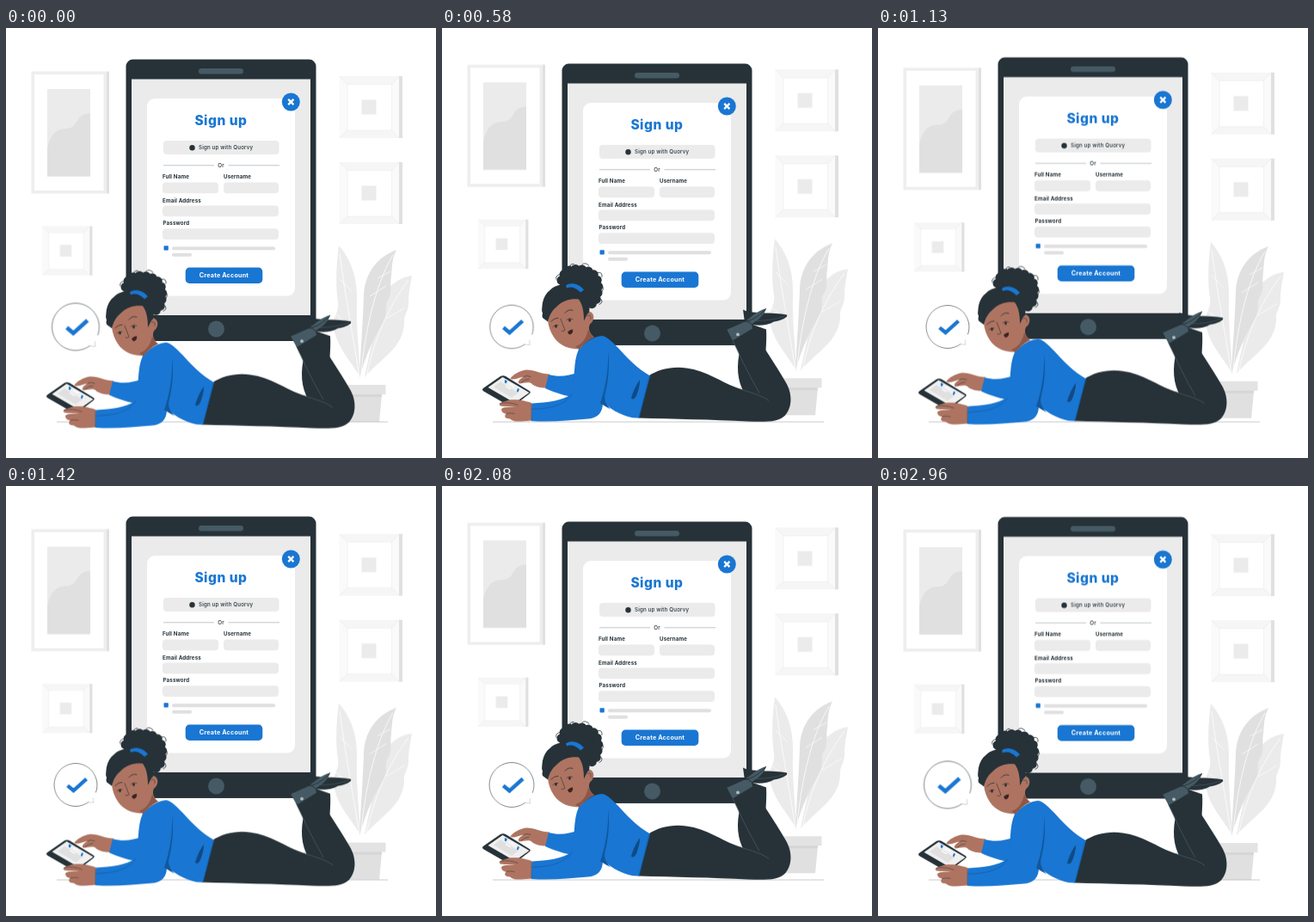
An HTML page for the animation above (3 s loop, 500x500 px).

```html
<!DOCTYPE html>
<html lang="en">
<head>
<meta charset="utf-8">
<title>Sign up</title>
<style>
  html, body { margin: 0; width: 100%; height: 100%; overflow: hidden; background: #fff; }
  svg { display: block; width: 100%; height: 100%; }
  text { font-family: Inter, "Open Sans", sans-serif; fill: #263238; }
  .label { font-size: 6.2px; font-weight: 700; letter-spacing: .14px; }
  .small { font-size: 6.2px; font-weight: 500; letter-spacing: .17px; }
  .mid { text-anchor: middle; }
  .blue { fill: #1976d2; }
  .dark { fill: #263238; }
  .slate { fill: #455a64; }
  .skin { fill: #ae7461; }
  .g2 { fill: #ebebeb; }
  .g3 { fill: #e0e0e0; }
  .line { fill: none; stroke: #263238; stroke-width: .8; stroke-linecap: round; stroke-linejoin: round; }
  .curls { fill: none; stroke: #263238; stroke-linecap: round; }
  .float { animation: float 1.5s linear -25ms infinite; }
  .late { animation-delay: -1025ms; }
  .pulse { animation: pulse 1s linear infinite; transform-origin: 81px 347.5px; }
  @keyframes float { 50% { transform: translateY(-10px); } }
  @keyframes pulse {
    0%, 74%, 100% { transform: scale(1.1); }
    13%, 56% { transform: scale(1); }
  }
</style>
</head>
<body>
<svg viewBox="0 0 500 500">
  <defs>
    <g id="frame">
      <path class="g3" d="M69 0h4.500v72h-4.500z"/>
      <path d="M0 0h69.500v72H0z" fill="#fafafa"/>
      <path d="M0 0h69.500L61 9.500H9.500zM0 72h69.500L61 63H9.500z" fill="#f6f6f6"/>
      <path d="M9.500 9.500H61V63H9.500z" fill="#fff" stroke="#ebebeb" stroke-width=".6"/>
      <path d="M0 0l9.500 9.500M69.500 0L61 9.500M0 72l9.500-9M69.500 72L61 63" stroke="#e6e6e6" stroke-width=".5"/>
      <path class="g2" d="M26 27.500h17v17H26z"/>
    </g>
  </defs>

  <!-- wall and plant -->
  <g class="float"><g transform="translate(0 .3)">
    <path class="g3" d="M117 50.500h3v142h-3z"/>
    <path d="M29.500 50.500H117v142H29.500z" fill="#eee"/>
    <path d="M33 54h80.500v135H33z" fill="#fff"/>
    <path class="g2" d="M48 71h50v101.500H48z"/>
    <path class="g3" d="M48 140C51 124 59 117 69 117C82 117 82 106 88 102C92 99 95 100 98 99V172.500H48z"/>
    <use href="#frame" x="387.500" y="56"/>
    <use href="#frame" x="387.500" y="156"/>
    <use href="#frame" transform="translate(42 230.500) scale(.795)"/>

    <path class="g2" d="M387 253C400 268 409 288 408 318C407 350 411 380 412 406C401 387 383 370 381 346C380 335 388 330 386 318C383 300 384 275 387 253z"/>
    <path class="g2" d="M472 288C450 291 434 310 430 336C427 365 420 388 417 406C436 384 462 372 463 343C462 334 468 330 468 320C468 308 470 300 472 288z"/>
    <path class="g3" d="M454 258C432 266 417 285 416 311C415 345 412 380 411 408C418 380 429 357 439 342C444 334 440 325 443 318C450 309 446 300 448 288C449 276 449 268 454 258z"/>
    <path d="M388 262C394 310 404 360 412 412M450 264C428 300 416 360 412 412M468 293C444 325 426 365 418 412" fill="none" stroke="#fff" stroke-width=".8"/>
    <path d="M382 332l18 14M388 292l14 14M442 300l-19 12M447 283l-15 8M464 325l-22 13" stroke="#fff" stroke-width=".7"/>
    <path class="g3" d="M378 426H437L434 458H382z"/>
    <path d="M376 415h65.500v11H376z" fill="#e3e3e3"/>
    <path d="M378 426H437l-.4 3H378z" fill="#d6d6d6"/>
  </g></g>

  <path d="M59 458H444" stroke="#bdbdbd" stroke-width=".8"/>

  <!-- big device -->
  <g class="float late"><g transform="translate(0 5.900)">
    <rect class="dark" x="139.500" y="37" width="221" height="327.500" rx="8"/>
    <path class="g2" d="M146 60H354V334.500H146z"/>
    <rect class="slate" x="224" y="47.500" width="52" height="6.500" rx="3.250"/>
    <circle class="slate" cx="244.500" cy="350.500" r="9.500"/>
    <rect x="164" y="82.500" width="172" height="229.500" rx="9" fill="#fff"/>
    <circle class="blue" cx="331.300" cy="86.400" r="10.500"/>
    <path d="M328.200 83.300l6.200 6.200m0-6.200l-6.200 6.200" stroke="#fff" stroke-width="2.300"/>
    <text class="mid" x="249.900" y="113.300" font-size="15.500" font-weight="800" letter-spacing=".5" style="fill:#1976d2">Sign up</text>

    <rect class="g2" x="183" y="131.500" width="134.500" height="16" rx="4"/>
    <circle class="dark" cx="216.500" cy="139.700" r="3.200"/>
    <text class="small" x="224" y="141.800">Sign up with Quorvy</text>
    <path d="M183 160.200H242M258.500 160.200H318" stroke="#90a0a8" stroke-width=".6"/>
    <text class="small mid" x="250" y="162">Or</text>

    <text class="label" x="182" y="175.400">Full Name</text>
    <text class="label" x="253" y="175.400">Username</text>
    <text class="label" x="182" y="203.100">Email Address</text>
    <text class="label" x="182.500" y="229.900">Password</text>
    <g class="g2">
      <rect x="182" y="180" width="65" height="12.600" rx="4"/>
      <rect x="253" y="180" width="64" height="12.600" rx="4"/>
      <rect x="182" y="207" width="135" height="12.600" rx="4"/>
      <rect x="182" y="233.700" width="135" height="12.600" rx="4"/>
    </g>
    <rect class="blue" x="183.500" y="253.700" width="5.300" height="5.300" rx=".8"/>
    <rect class="g3" x="193" y="254.700" width="120" height="4" rx="2"/>
    <rect class="g3" x="193" y="262.200" width="23" height="4" rx="2"/>
    <rect class="blue" x="208.700" y="279" width="89.600" height="18.300" rx="4.500"/>
    <text class="mid" x="253.500" y="290.600" font-size="7.200" font-weight="700" letter-spacing=".18" style="fill:#fff">Create Account</text>
  </g></g>

  <!-- speech bubble -->
  <g class="pulse">
    <circle cx="81" cy="347.500" r="25" fill="#fff"/>
    <path d="M104.500 356A25 25 0 1 0 96 367.500" class="line" style="stroke-width:.55"/>
    <path d="M101.500 362.500Q101 366 102 368Q99 368.500 96 367.500" fill="#fff" stroke="#90989c" stroke-width=".4"/>
    <path d="M71.600 348.300L78.500 354.200L93.500 340.600" fill="none" stroke="#1976d2" stroke-width="4.300"/>
  </g>

  <!-- woman -->
  <g class="float"><g transform="translate(0 1.400)">
    <!-- far leg and shoe -->
    <path class="dark" d="M357 350L377 357C378 375 375 386 377 400L398 436L352 432C343 416 342 400 347 378L360 364z"/>
    <path class="dark" d="M350 334C356 339 386 337 401 340C403 343 394 347 386 348C376 354 362 353 352 349z"/>
    <path d="M362 347C376 347 388 346 399 341" fill="none" stroke="#455a64" stroke-width=".7"/>

    <!-- near leg -->
    <path class="dark" d="M239 412C252 403 268 400 284 402C308 405 325 419 346 426C354 429 362 430 368 430C357 410 347 388 337 368L361 355C372 376 387 396 400 419C407 431 408 447 399 457C391 465 376 465 355 464C315 462 268 461 228 460z"/>
    <path d="M338 370C347 390 358 412 369 431M346 426C358 431 369 432 380 440" fill="none" stroke="#52656e" stroke-width=".6"/>
    <path class="slate" d="M331 357L353 347C360 343 365 336 377 332.500C375 341 366 347 360 351L361 356L338 370z"/>
    <path d="M331 357L354 347L360 351M352 348C362 347 370 340 377 333" fill="none" stroke="#263238" stroke-width=".9"/>
    <circle cx="344" cy="363" r="1.900" fill="#b0bec5"/>

    <!-- far arm -->
    <path class="skin" d="M125 409C115 409 108 404 98 404C90 405 82 410 79.500 414C82 417 90 413 95 412C90 415 87 418 90 420C95 420 102 417 105 421C111 425 117 425 122 425z"/>
    <path class="line" style="stroke-width:.5" d="M95 412Q99 410 103 412M92 419Q96 415 101 415"/>
    <path class="blue" d="M124 409.500C136 413 148 411 158 407L156 436C144 435 130 430 120 425.500z"/>

    <!-- small tablet -->
    <path class="dark" d="M68 411.500Q71 410 74 411.500L101.500 428.500Q104 430 101.500 432L84 445.500Q81 447.500 78 446L48.500 429Q45.500 427 48.500 425z"/>
    <path d="M70.500 412.500L101.500 430.500L84.500 442.500L53.500 424.500z" fill="#f0f0f0"/>
    <path class="g3" d="M68 418L89 430.500L81 436.500L60 424z"/>
    <path d="M73 415.500l3 1.700-1.500 3-1.700-1zM88 425.500l2 1.200-1.500 3.500-1.700-1z" class="blue"/>
    <path d="M78 420l6 3.500M74 423l6 3.500" stroke="#fff" stroke-width="1.200"/>

    <!-- near hand -->
    <path class="skin" d="M105 443C97 440 83 437 74 440.500C67 442 65 444 68 446C73 447 80 446 85 447C78 447 70 447 69 450C69 453 72 455 75 455C71 458 74 461 79 461C82 464 88 464.500 92 464L105 463z"/>
    <path class="line" style="stroke-width:.5" d="M68 443Q78 441 88 445M75 455Q80 454 84 455"/>

    <!-- shirt -->
    <path class="blue" d="M159 380C166 373 173 366 186 364.500C199 366 214 395 242 411L229 460C215 461 199 452 187 442C187 454 181 460 170 461C148 463 126 465 104 463.500L105 443C122 442 140 440 151 432C155 417 152 395 159 380z"/>
    <path d="M193 383C194 404 190 426 184 443C189 446 193 448 196 450C189 442 188 438 190 430C194 413 195 396 193 383z" fill="#12579c"/>
    <path d="M104 450C122 449 139 448 151 433M104 444V463" fill="none" stroke="#125a9f" stroke-width=".6"/>
    <path d="M230 416C226 421 222 430 220 437C222 439 224 438 226 434C228 428 230 423 230 416z" fill="#104a85"/>
    <path d="M241 412L229 460" stroke="#125a9f" stroke-width=".8"/>

    <!-- ponytail -->
    <ellipse class="dark" cx="161" cy="307" rx="24" ry="22"/>
    <path class="curls" d="M139 300C142 286 157 285 168 289C181 292 183 305 181 315C180 324 176 328 171 328" stroke-width="11" stroke-dasharray="0 7.500"/>
    <path class="line" d="M138 293Q131 294 133 299M150 286Q147 281 153 281M163 282Q166 278 171 283M181 291Q187 290 186 296M186 306Q189 309 186 313M185 322Q188 326 183 328"/>

    <!-- head -->
    <path class="skin" d="M123 347C124 335 140 322 157 317L170 336C177 336 179 346 172 351C169 357 173 363 177 366C171 368 164 374 159 380C150 380 137 377 130 366C126 360 124 354 123 347z"/>
    <path d="M155 377C163 374 168 368 170 357C172 362 174 365 177 366C170 369 164 375 160 380z" fill="#8d5747"/>
    <path class="dark" d="M119 345C114 334 116 318 126 311C134 303 147 304 156 309C167 314 174 324 171 337C168 339 167 344 165 347C165 338 164 329 159 322C150 321 141 323 134 330C128 335 125 340 123 348z"/>
    <path class="curls" d="M120.500 341C118 327 128 314 143 309" stroke-width="8" stroke-dasharray="0 6.500"/>
    <path class="blue" d="M144 306C150 302 159 304 165 311L161 314C155 308 150 307 145 309z"/>
    <path d="M169 341Q174 339 173 345" class="line" style="stroke-width:.5"/>
    <g class="line">
      <path d="M127 348Q130 344 135 344M143 338Q147 333 152 335"/>
      <path d="M138 345C140 349 141 354 143 358Q141 360 139 359" style="stroke-width:.6"/>
      <path d="M129 354Q132 351 135 352M145 346Q148 343 152 345" style="stroke-width:.6"/>
    </g>
    <ellipse class="dark" cx="132.500" cy="353.500" rx="1.400" ry="1.800"/>
    <ellipse class="dark" cx="148.500" cy="346.500" rx="1.400" ry="1.800"/>
    <path d="M146 360Q149 357 152 357Q153 361 149 363Q147 363 146 360z" fill="#3a2421"/>
  </g></g>
</svg>
</body>
</html>
```
